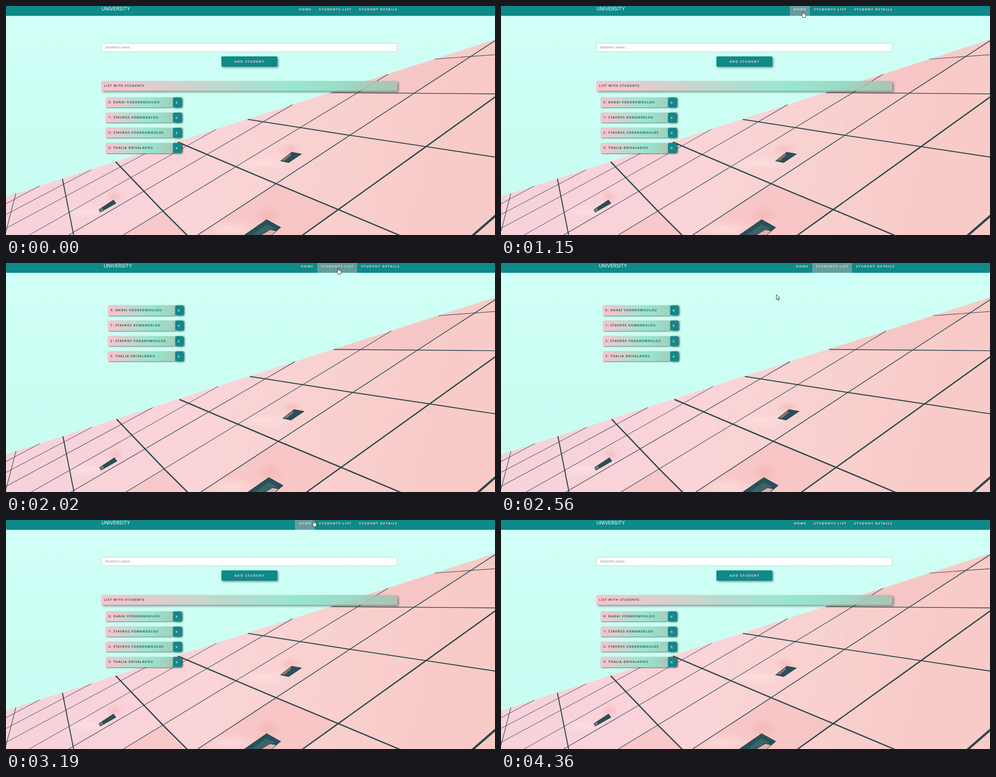
An HTML page for the animation above (4440 ms loop, 1092 px wide and 513 px high).

```html
<!DOCTYPE html>
<html lang="en">
<head>
<meta charset="utf-8">
<title>Student list</title>
<style>
  html, body { margin: 0; width: 100%; height: 100%; overflow: hidden; }
  body { position: relative; font: 600 7px "Open Sans", sans-serif; letter-spacing: 1.1px; color: #1d3a3c; }
  div, svg { position: absolute; box-sizing: border-box; white-space: nowrap; }
  .page, .page > svg, .overlay { left: 0; top: 0; width: 1092px; height: 513px; overflow: hidden; }
  .header { left: 0; top: 0; width: 100%; height: 22px; background: #0d8a89; }
  .ui { left: 0; top: 0; }
  .b .ui { left: 4.6px; }

  .brand { left: 213.3px; top: 0; font: 400 10.7px/14.5px Inter, sans-serif; letter-spacing: 0; color: #fff; }
  .link { top: -8px; height: 30px; line-height: 30.5px; padding-left: 8.6px; }
  .link, .button, .x { font-size: 7.45px; font-weight: 700; letter-spacing: 1.4px; color: #f9c9d0; }

  .field { left: 213px; top: 83px; width: 661px; height: 20px; padding-left: 7px; border: 1px solid #c4cfcd; border-radius: 3px;
    background: #fff; font: 400 8px/18px "Liberation Sans", sans-serif; letter-spacing: 0; color: #8a8a8a; }
  .button { left: 481px; top: 113px; width: 125px; height: 23px; padding-left: 29px; line-height: 23px; border-radius: 2px;
    background: #0d8a89; box-shadow: 2px 2px 5px rgba(0,0,0,.45); }
  .title, .label { background: linear-gradient(90deg, #fcc2cc, rgba(148,230,206,.96) 65%, rgba(150,195,175,.8)); }
  .title { left: 213px; top: 168px; width: 661px; height: 22px; padding-left: 6px; line-height: 22px; border-radius: 2px;
    box-shadow: 3px 3px 5px rgba(0,0,0,.4); }
  .list { left: 223px; top: 204.5px; }
  .b .list { top: 95.2px; }
  .label { width: 150px; height: 22.5px; padding-left: 5.5px; line-height: 22.5px; border-radius: 2px; box-shadow: 1px 1px 3px rgba(0,0,0,.6); }
  .x { left: 150px; width: 18.5px; height: 22px; padding-left: 5.5px; line-height: 22px; border-radius: 2px; background: #0d8a89;
    box-shadow: 2px 1px 4px rgba(0,0,0,.8); }

  .b, .link, .cursor, .arrow, .hand, .click { animation: 4440ms step-end infinite; }
  .b { animation-name: second-page; }
  .a .home { animation-name: home-a; }
  .a .students { animation-name: students-a; }
  .b .home { animation-name: home-b; }
  .b .students { animation-name: students-b; }
  .cursor { animation-name: travel; }
  .arrow { animation-name: arrow; }
  .hand { animation-name: hand; }
  .click { animation-name: click; }

  @keyframes second-page { 0%, 71.73%, 100% { visibility: hidden } 45.38% { visibility: visible } }
  @keyframes home-a { 0%, 34.7%, 98.1%, 100% { background: transparent } 11.82%, 71.73% { background: #639d9e } }
  @keyframes students-a { 0%, 45.38%, 100% { background: transparent } 34.7% { background: #639d9e } }
  @keyframes home-b { 0% { background: transparent } 62.95%, 100% { background: #639d9e } }
  @keyframes students-b { 0% { background: #639d9e } 68.36%, 100% { background: transparent } }
  @keyframes arrow { 0%, 47.18%, 73.54%, 100% { opacity: 1 } 11.82%, 62.95% { opacity: 0 } }
  @keyframes hand { 0%, 47.18%, 73.54%, 100% { opacity: 0 } 11.82%, 62.95% { opacity: 1 } }
  @keyframes click {
    0%, 45.38%, 71.73%, 100% { transform: translate(-50px, -50px) }
    43.58% { transform: translate(741px, 12px) }
    68.36% { transform: translate(685px, 6px) }
  }
  @keyframes travel {
    0% { transform: translate(-50px, -50px) }
    1.46% { transform: translate(828px, 334px); animation-timing-function: steps(3) }
    6.64% { transform: translate(736px, 124px); animation-timing-function: steps(3) }
    11.82% { transform: translate(673px, 21px) }
    13.4% { transform: translate(674px, 17px); animation-timing-function: steps(6) }
    24.21% { transform: translate(675px, 8px) }
    25.79% { transform: translate(674px, 12px) }
    33% { transform: translate(680px, 14px); animation-timing-function: steps(3) }
    38.3% { transform: translate(712px, 20px); animation-timing-function: steps(3) }
    43.58%, 45.38% { transform: translate(742px, 11.5px) }
    47.18% { transform: translate(730px, 24px); animation-timing-function: steps(5) }
    55.74% { transform: translate(612px, 73px) }
    57.55% { transform: translate(615px, 71px); animation-timing-function: steps(4) }
    64.75% { transform: translate(687px, 3px) }
    68.36%, 71.73% { transform: translate(687px, 1.5px) }
    73.54% { transform: translate(694px, 12px); animation-timing-function: steps(3) }
    78.83% { transform: translate(890px, 262px); animation-timing-function: steps(2) }
    82.32% { transform: translate(1046px, 456px) }
    84.12% { transform: translate(1050px, 464px); animation-timing-function: steps(6) }
    94.7%, 100% { transform: translate(1094px, 515px) }
  }
</style>
</head>
<body>
<div class="page a">
  <svg viewBox="0 0 1092 513">
    <defs>
      <linearGradient id="sky" x2="0" y2="1"><stop stop-color="#d0fff6"/><stop offset=".8" stop-color="#c9fdf2"/></linearGradient>
      <linearGradient id="wall" gradientUnits="userSpaceOnUse" x1="100" y1="370" x2="900" y2="560">
        <stop stop-color="#f8d2db"/><stop offset=".4" stop-color="#fad4d7"/><stop offset=".75" stop-color="#f9d0cf"/><stop offset="1" stop-color="#f8cbc8"/>
      </linearGradient>
      <radialGradient id="light"><stop stop-color="#ffe7e5" stop-opacity=".6"/><stop offset="1" stop-color="#ffe7e5" stop-opacity="0"/></radialGradient>
      <radialGradient id="blush"><stop stop-color="#eea5a2" stop-opacity=".4"/><stop offset="1" stop-color="#eea5a2" stop-opacity="0"/></radialGradient>
    </defs>
    <g id="photo">
      <path fill="url(#sky)" d="M0 0H1110V520H0Z"/>
      <path fill="url(#wall)" d="M0 427L1110 69.5V520H0Z"/>
      <path fill="#f3b4b2" opacity=".38" d="M603 398L742 456 663 513H428ZM350 459L404 513H262Z"/>
      <path fill="#f2b6ba" opacity=".3" d="M726 194L957 119 1050 110 920 190 912 195Z"/>
      <g fill="url(#light)">
        <ellipse cx="575" cy="352" rx="65" ry="16"/><ellipse cx="180" cy="460" rx="55" ry="15"/><ellipse cx="500" cy="500" rx="75" ry="24"/>
      </g>
      <g fill="url(#blush)">
        <ellipse cx="634" cy="322" rx="26" ry="15"/><ellipse cx="242" cy="427" rx="20" ry="18"/><ellipse cx="585" cy="468" rx="34" ry="24"/>
      </g>
      <path fill="none" stroke="#eeb3b4" stroke-opacity=".4" d="M531 288L480 400M783 195L768 288M600 405L585 470"/>
      <g fill="none" stroke="#2c474a">
        <path d="M75 403L0 443M190 367L0 467M325 323L0 498M470 276L50 514"/>
        <path stroke-width="1.2" d="M640 221L140 513M853 153L262 513M957 119L1110 107.7M22 420L0 505"/>
        <path stroke-width="1.6" d="M1110 66L912 195 428 513M726 194L1110 197"/>
        <path stroke-width="2.2" d="M540 254L767 289.500 938 315 1110 341M126 387L151 513"/>
        <path stroke-width="2.8" d="M384 305L603 398 742 456 882 515M245 349L350 459 406 515M1110 191L938 315 742 456 660 515"/>
        <path stroke-width="5" d="M1110 455L1040 516"/>
      </g>
      <g fill="#285159" stroke="#1f3a40">
        <path d="M613 347L638 327.5 660 331.5 631 351Z"/>
        <path d="M207.5 456L240 434.5 245.5 442 210.5 462Z"/>
        <path d="M528 516L582 478.5 613.5 496 590 516Z"/>
      </g>
      <path fill="#8d7771" d="M614 346.500L636 330V335L623 346ZM208.5 456L214 452.5 217 457 211 461Z"/>
      <path fill="#3b636a" d="M549 513L581 489 600 498 584 510Z"/>
      <path fill="#dfb0ad" stroke="#1f3a40" d="M565 516L590 501 604 504 590 516Z"/>
    </g>
  </svg>
  <div class="header"></div>
  <div class="ui">
    <div class="field">Student's name...</div>
    <div class="button">ADD STUDENT</div>
    <div class="title">LIST WITH STUDENTS</div>
  </div>
</div>
<div class="page b">
  <svg viewBox="0 0 1092 513"><use href="#photo" transform="translate(0 -2) scale(1.0085)"/></svg>
  <div class="header"></div>
  <div class="ui"></div>
</div>
<svg class="overlay" viewBox="0 0 1092 513">
  <circle class="click" r="7" fill="#d9de1c" fill-opacity=".78"/>
  <g class="cursor" fill="#fff" stroke="#111" stroke-width=".9" stroke-linejoin="round">
    <path class="arrow" d="M0 0V11.2L2.6 8.8 4.3 12.8 6 12 4.3 8.2H7.8Z"/>
    <path class="hand" d="M-1.1 8V.9Q0-.5 1.1.9V4.6Q2.3 4 3 5.1 4.3 4.5 4.9 5.7 6.4 5.4 6.6 7V9.5Q6.5 11 5.6 12V13.6H-.2V12.5L-3 8.6Q-2.8 6.9-1.1 8Z"/>
  </g>
</svg>
<script>
  const links = [
    ["home", "HOME", 645.3, 44.8],
    ["students", "STUDENTS LIST", 690.1, 89.6],
    ["details", "STUDENT DETAILS", 779.7, 102]
  ];
  const students = ["DANAI VODAROMOULOU", "STAVROS KOMANDELOU", "STAVROS VODAROMOULOS", "THALIA GRIVALADOU"];

  const nav = '<div class="brand">UNIVERSITY</div>' + links.map(([name, text, x, w]) =>
    `<div class="link ${name}" style="left:${x}px;width:${w}px">${text}</div>`).join("");
  const list = '<div class="list">' + students.map((name, i) =>
    `<div style="top:${i * 34.2}px"><div class="label">${i}: ${name}</div><div class="x">X</div></div>`).join("") + "</div>";

  for (const ui of document.querySelectorAll(".ui")) ui.insertAdjacentHTML("beforeend", nav + list);
</script>
</body>
</html>
```
